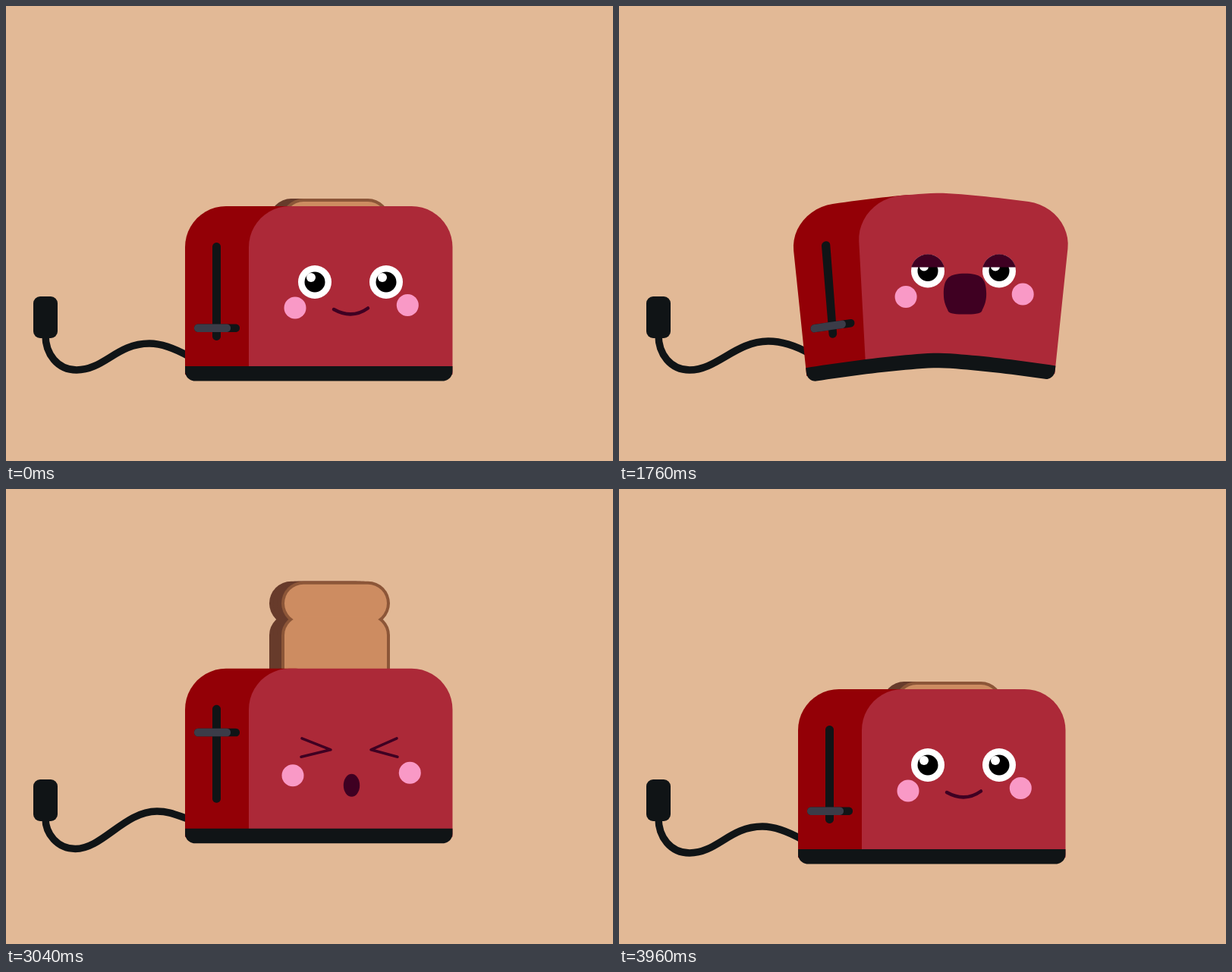
These frames come from a looping animation (800 px wide and 600 px high, 6 s). An HTML page with a canvas:

```html
<!DOCTYPE html>
<html lang="en">
<head>
<meta charset="utf-8">
<title>Sneezing toaster</title>
<style>
  html, body { margin: 0; width: 100%; height: 100%; overflow: hidden; background: #e2b996; }
  canvas { display: block; width: 800px; height: 600px; }
</style>
</head>
<body>
<canvas id="stage" width="800" height="600"></canvas>
<script>
const ctx = document.getElementById('stage').getContext('2d');
const LOOP = 6000, STEP = 40;
const DROWSY = 240, INHALE = 800, SNEEZE = 2960, RECOVER = 3520;
const C = {
  wall: '#e2b996', front: '#ac2938', side: '#930006', black: '#101416', knob: '#3b3c48',
  plum: '#3f0022', cheek: '#f999c6', crumb: '#cd8c61', crust: '#8c5638', crustSide: '#673b2b'
};

const smooth = p => (1 - Math.cos(Math.PI * p)) / 2;
const speedUp = p => p * p;
const slowDown = p => p * (2 - p);
const mix = (a, b, p) => a + (b - a) * p;

// Everything the drawing needs to know about time t.
function poseAt(t) {
  const ramp = (start, end, ease = smooth) => ease(Math.min(1, Math.max(0, (t - start) / (end - start))));

  const drowsy = ramp(DROWSY, 600) - ramp(RECOVER, 3840);
  const breath = ramp(INHALE, 1320) - ramp(1640, 2140) + ramp(2220, 2780) - ramp(2880, SNEEZE);
  const bend = 1.05 * (ramp(840, 1640) - ramp(2880, 3000, speedUp)) - .72 * (ramp(1640, 2180) - ramp(2220, 2840));
  const open = ramp(INHALE, 1320);
  const hop = ramp(SNEEZE, 3200, slowDown) - ramp(3300, 3440, speedUp);
  const flight = ramp(SNEEZE, 3220, slowDown) - ramp(3280, 3461, speedUp);
  const lever = ramp(SNEEZE, 3080, slowDown) - ramp(3380, 3480);
  const sneezing = t >= SNEEZE && t < RECOVER;

  return {
    bend, hop, sneezing,
    toastY: 254 * (1 - flight),
    leverY: 419.5 - 86 * lever,
    faceY: 7 * drowsy - 25 * breath,
    lid: 22 * (ramp(DROWSY, 840) - ramp(RECOVER, 3760)) - 5 * bend,
    spread: sneezing ? 3 : 3 * bend,
    smile: 1 - ramp(DROWSY, 640) + ramp(RECOVER, 3880),
    smiling: t < INHALE || t >= RECOVER,
    mouth: { y: 418 - 9 * open - 34 * breath, w: 21 + 31 * open + 5 * breath, h: 4 + 35 * open + 17 * breath }
  };
}

// Arches the toaster upwards and fans its sides out at the top.
function warp([x, y], bend) {
  const reach = Math.abs(x - 422) / (186 - .1 * (494 - y));
  return [
    x + ((x - 412) * (361 - y) * .0006 - 1.5) * bend,
    y + (20 * reach ** 1.4 - 18) * bend
  ];
}

// Outline of a box, with one radius for the top corners and one for the bottom ones.
function boxPoints(x, y, w, h, top, bottom = top) {
  const corners = [];
  for (let i = 0; i < 4; i++) {
    const r = i < 2 ? top : bottom;
    const cx = i % 3 ? x + w - r : x + r, cy = i < 2 ? y + r : y + h - r;
    for (let k = 0; k <= 12; k++) {
      const a = Math.PI * (1 + i / 2 + k / 24);
      corners.push([cx + r * Math.cos(a), cy + r * Math.sin(a)]);
    }
  }
  return corners.flatMap((p, i) => {
    const q = corners[(i + 1) % corners.length];
    const n = Math.ceil(Math.hypot(q[0] - p[0], q[1] - p[1]) / 8) || 1;
    return Array.from({ length: n }, (_, k) => [mix(p[0], q[0], k / n), mix(p[1], q[1], k / n)]);
  });
}

function fillBent(points, color, bend) {
  ctx.beginPath();
  points.forEach(p => ctx.lineTo(...warp(p, bend)));
  ctx.fillStyle = color;
  ctx.fill();
}

function box(x, y, w, h, r, color) {
  ctx.beginPath();
  ctx.roundRect(x, y, w, h, r);
  ctx.fillStyle = color;
  ctx.fill();
}

function oval(x, y, rx, ry, color) {
  ctx.beginPath();
  ctx.ellipse(x, y, rx, ry, 0, 0, 2 * Math.PI);
  ctx.fillStyle = color;
  ctx.fill();
}
const disc = (x, y, r, color) => oval(x, y, r, r, color);

function stroke(path, width, color) {
  ctx.lineWidth = width;
  ctx.strokeStyle = color;
  ctx.stroke(path);
}

// A slice is two overlapping rounded boxes, which meet in the notches.
function drawSlice(x, y, inset, color) {
  const w = 143 - 2 * inset;
  box(x + inset, y + inset, w, 58 - 2 * inset, 29 - inset, color);
  box(x + inset, y + 43 + inset, w, 127 - 2 * inset, 28 - inset, color);
}

function drawToast(y) {
  for (const x of [347, 352, 357]) drawSlice(x, y, 0, C.crustSide);
  drawSlice(363, y, 0, C.crust);
  drawSlice(363, y, 4, C.crumb);
}

function drawCord(bend, hop) {
  const lowX = 93 - 3 * hop, lowY = 480 - 10 * hop;
  const topX = 189 + 18 * hop + 8 * bend, topY = 445 - 36 * hop - 3 * bend;
  const endX = 242 + 10 * bend, endY = 462.5 - 48 * hop - 4 * bend;
  const cord = new Path2D();
  cord.moveTo(52, 434);
  cord.bezierCurveTo(52, 459 - 7 * hop, 68, lowY, lowX, lowY);
  cord.bezierCurveTo(lowX + 36, lowY, topX - 43, topY, topX, topY);
  cord.bezierCurveTo(topX + 18, topY, endX - 16, endY - 9 + 7 * hop, endX, endY);
  stroke(cord, 9.5, C.black);
  box(36, 383, 32, 55, 9, C.black);
}

function drawBody({ bend, leverY }) {
  fillBent(boxPoints(236, 264, 200, 222, 54, 0), C.side, bend);
  fillBent(boxPoints(320, 264, 268.5, 222, 54, 0), C.front, bend);
  fillBent(boxPoints(236, 475, 352.5, 19.5, 0, 13), C.black, bend);
  fillBent(boxPoints(272, 312, 11, 129, 5.5), C.black, bend);
  fillBent(boxPoints(248, leverY, 60, 10.5, 5), C.black, bend);
  fillBent(boxPoints(248, leverY, 48, 10.5, 5), C.knob, bend);
}

function drawEye(x, y, lid) {
  disc(x, y, 22, '#fff');
  disc(x, y, 13.5, '#000');
  disc(x - 5, y - 6, 6, '#fff');
  if (lid <= 0) return;
  ctx.save();
  ctx.beginPath();
  ctx.rect(x - 23, y - 23, 46, lid + 1);
  ctx.clip();
  disc(x, y, 22.2, C.plum);
  ctx.restore();
}

function drawSmile(size, dy) {
  const half = mix(10, 22.5, size), y = mix(410, 399.5, size) + dy;
  const smile = new Path2D();
  smile.moveTo(454.5 - half, y + .5);
  smile.quadraticCurveTo(456, y + mix(5.5, 14, size), 454.5 + half, y - 1);
  stroke(smile, mix(2, 4.5, size), C.plum);
}

function drawOpenMouth({ y, w, h }) {
  ctx.save();
  ctx.translate(456, y - h / 2);
  ctx.beginPath();
  for (const side of [-1, 1]) {
    const rx = side * w / 2;
    ctx.moveTo(0, 0);
    ctx.bezierCurveTo(.72 * rx, 0, rx, .1 * h, rx, .5 * h);
    ctx.bezierCurveTo(rx, .72 * h, .87 * rx, .82 * h, .79 * rx, .92 * h);
    ctx.bezierCurveTo(.74 * rx, .99 * h, .4 * rx, h, 0, h);
  }
  ctx.fillStyle = C.plum;
  ctx.fill();
  ctx.restore();
}

const squint = new Path2D('M390 356L428 371L389 380.5M515 356L481 371L516 380.5');

function drawFace({ faceY, spread, sneezing, lid, smiling, smile, mouth }) {
  disc(381 - spread, 398 + faceY, 14.5, C.cheek);
  disc(529.3 + spread, 394.5 + faceY, 14.5, C.cheek);
  if (sneezing) {
    stroke(squint, 3.5, C.plum);
    oval(455.5, 418, 10.7, 15, C.plum);
    return;
  }
  for (const x of [407, 501]) drawEye(x, 364 + faceY, lid);
  if (smiling) drawSmile(smile, faceY);
  else drawOpenMouth(mouth);
}

function draw(t) {
  const pose = poseAt(t);
  ctx.fillStyle = C.wall;
  ctx.fillRect(0, 0, 800, 600);
  ctx.lineCap = ctx.lineJoin = 'round';
  drawCord(pose.bend, pose.hop);
  drawToast(pose.toastY);
  ctx.save();
  ctx.translate(0, -49 * pose.hop);
  drawBody(pose);
  drawFace(pose);
  ctx.restore();
}

const begin = performance.now();
function tick() {
  const t = (performance.now() - begin) % LOOP;
  draw(Math.floor(t / STEP) * STEP);
  requestAnimationFrame(tick);
}
tick();
</script>
</body>
</html>
```
